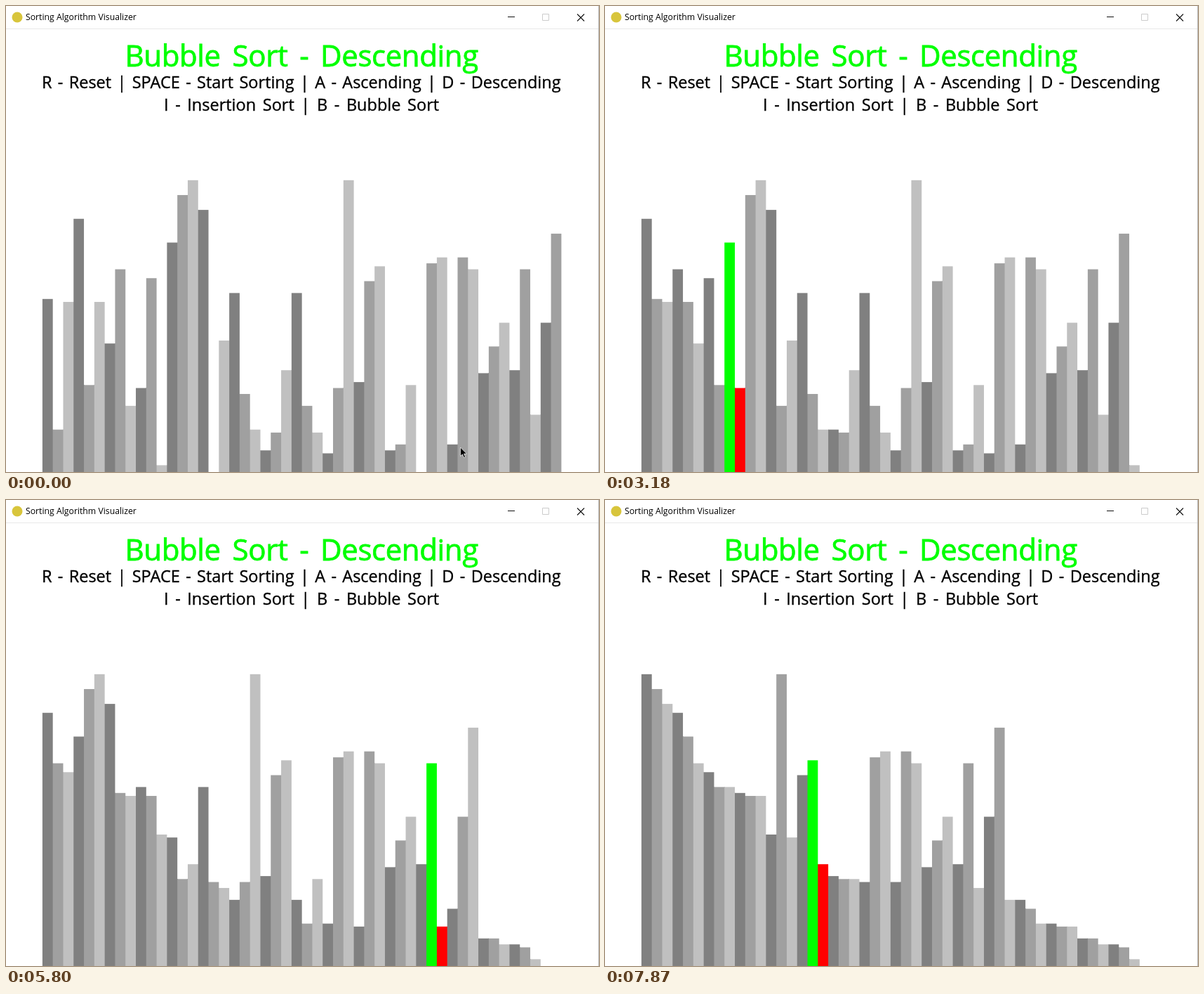
Write an HTML page with a canvas that moves like this. It is 845 px wide and 663 px high and loops after 7990 ms.

```html
<!DOCTYPE html>
<html lang="en">
<head>
<meta charset="utf-8">
<title>Sorting Algorithm Visualizer</title>
<style>
  html, body { margin: 0; width: 100%; height: 100%; overflow: hidden; background: #fff; }
  canvas, svg { position: absolute; left: 0; top: 0; display: block; }
  text { font-family: "Open Sans", "Noto Sans", sans-serif; }
  .caption { font-size: 12.25px; }
  .heading { font-size: 42px; letter-spacing: -.4px; word-spacing: 6.3px; fill: #0f0; stroke: #0f0; stroke-width: .8px; }
  .help { font-size: 23.5px; word-spacing: 2.2px; stroke: #000; stroke-width: .35px; }
  .modes { word-spacing: 3.5px; }
  #pointer { animation: hide 7990ms step-end infinite; }
  @keyframes hide { 36.04% { visibility: hidden; } }
</style>
</head>
<body>
<canvas id="bars" width="845" height="663"></canvas>
<svg width="845" height="663" viewBox="0 0 845 663">
  <circle cx="16" cy="16" r="7.5" fill="#d8c53c"/>
  <text class="caption" x="28" y="20">Sorting Algorithm Visualizer</text>
  <path d="M715 15.5h10" stroke="#111"/>
  <path d="M764.5 11.5h9v9h-9z" fill="none" stroke="#ccc"/>
  <path d="M814 11.5l10 10m0-10l-10 10" stroke="#111" stroke-width="1.1"/>
  <path d="M0 32.5h845" stroke="#e8e8e8"/>
  <path d="M844.5 0v663" stroke="#b8b8b8"/>
  <text class="heading" x="169.5" y="86">Bubble Sort - Descending</text>
  <text class="help" x="51" y="117">R - Reset | SPACE - Start Sorting | A - Ascending | D - Descending</text>
  <text class="help modes" x="225" y="149">I - Insertion Sort | B - Bubble Sort</text>
  <path id="pointer" d="M647.5 628v12.5l2.9-2.7 2.2 4.8 2-.9-2.1-4.6h4z" stroke="#fff" stroke-width=".7"/>
</svg>
<script>
const LOOP = 7990;
const LEFT = 51.9, PITCH = 14.79;
const BASE = 661.8, UNIT = 4.224, FLOOR = 663;
const GREYS = ['#808080', '#a0a0a0', '#c0c0c0'];

// The unsorted input.
const VALUES = [
  58, 14, 57, 85, 29, 57, 43, 68, 22, 28, 65, 2, 77, 93, 98, 88, 0,
  44, 60, 26, 14, 7, 13, 34, 60, 22, 13, 6, 28, 98, 30, 64, 69, 7,
  9, 29, 0, 70, 72, 9, 72, 68, 33, 42, 50, 34, 68, 19, 50, 80
];

// Key points of the run; screen updates are spread evenly between them.
const KEYS = [
  { ms: 1320, update: 0, swaps: 7 },
  { ms: 2190, update: 7, swaps: 62 },
  { ms: 3180, update: 14, swaps: 126 },
  { ms: 4240, update: 22, swaps: 193 },
  { ms: 5800, update: 34, swaps: 291 },
  { ms: 6940, update: 43, swaps: 363 },
  { ms: 7870, update: 50, swaps: 422 }
];

function bubbleSort(values) {
  const list = [...values];
  const states = [{ list: [...list], at: -9 }];
  for (let end = list.length - 1; end > 0; end--) {
    for (let j = 0; j < end; j++) {
      if (list[j] >= list[j + 1]) continue;
      [list[j], list[j + 1]] = [list[j + 1], list[j]];
      states.push({ list: [...list], at: j });
    }
  }
  return states;
}

function swapsAt(time) {
  const next = KEYS.findIndex(key => key.ms > time);
  if (next === 0) return 0;
  if (next < 0) return KEYS[KEYS.length - 1].swaps;
  const a = KEYS[next - 1], b = KEYS[next];
  const updates = b.update - a.update;
  const done = Math.floor(updates * (time - a.ms) / (b.ms - a.ms)) / updates;
  return Math.floor(a.swaps + (b.swaps - a.swaps) * done);
}

const states = bubbleSort(VALUES);
const ctx = document.getElementById('bars').getContext('2d');

function draw({ list, at }) {
  const topOf = i => BASE - UNIT * list[i];
  const column = (x, width, top) => ctx.fillRect(x, top, width, FLOOR - top);
  ctx.clearRect(0, 0, 845, FLOOR);
  list.forEach((value, i) => {
    if (!value) return;
    const x = LEFT + PITCH * i;
    ctx.fillStyle = i === at ? '#0f0' : i === at + 1 ? '#f00' : GREYS[i % 3];
    column(x, PITCH, topOf(i));
    // Fill the shared edge pixel so that neighbours blend without a seam.
    if (list[i + 1]) column(Math.floor(x + PITCH), 1, Math.max(topOf(i), topOf(i + 1)));
  });
}

const begin = performance.now();

function tick() {
  draw(states[swapsAt((performance.now() - begin) % LOOP)]);
  requestAnimationFrame(tick);
}
tick();
</script>
</body>
</html>
```
